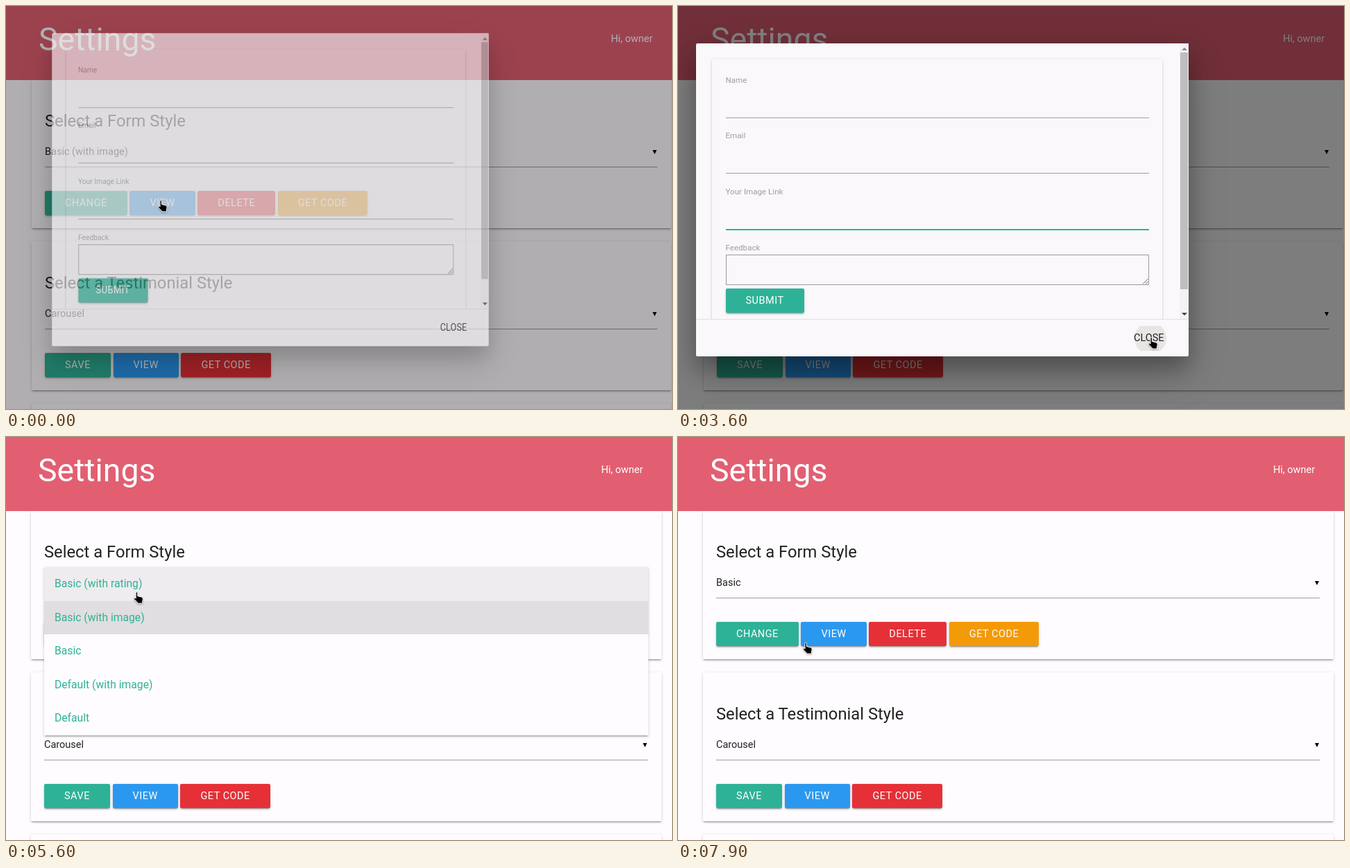
Write an HTML page that moves like this. It is 960 px wide and 582 px high and loops after 8 s.

```html
<!DOCTYPE html>
<html lang="en">
<head>
<meta charset="utf-8">
<title>Settings</title>
<style>
  html, body { margin: 0; width: 100%; height: 100%; overflow: hidden; background: #fefcfe; }
  body { font: 14.5px Roboto, sans-serif; color: rgba(0,0,0,.87); }
  #stage { position: relative; width: 960px; height: 582px; overflow: hidden; background: #fefcfe; }
  #stage div, #stage svg { position: absolute; box-sizing: border-box; }
  .text { line-height: 20px; white-space: pre; }
  .card { border-radius: 2px; background: #fefcfe; }
  .card, .btn, #menu { box-shadow: 0 2px 2px rgba(0,0,0,.14), 0 1px 5px rgba(0,0,0,.12), 0 3px 1px -2px rgba(0,0,0,.2); }
  #page { left: 0; top: 0; width: 945px; height: 582px; }
  #page.wide { left: 1px; width: 958px; }
  #page .card { left: 36px; right: 0; height: 215px; }
  #head { left: -1px; top: 0; width: 961px; height: 107px; background: #e25f72; color: #fff; }
  .rule { left: 19px; right: 20px; height: 1px; background: #9e9e9e; }
  .arrow { border: 3px solid transparent; border-top: 6px solid #000; border-bottom: 0; }
  .row { left: 19px; white-space: nowrap; }
  .btn { display: inline-block; height: 35px; line-height: 35px; padding: 0 29px; border-radius: 2px; color: #fff; letter-spacing: .5px; }
  #overlay { inset: 0; background: #000; }
  #modal { left: 26px; top: 54px; width: 710px; height: 452px; background: #faf8fb; border-radius: 2px; overflow: visible;
    box-shadow: 0 16px 28px rgba(0,0,0,.22), 0 25px 55px rgba(0,0,0,.21); }
  #content { left: 0; top: 0; width: 710px; height: 398px; overflow: hidden; }
  #content .card { left: 23px; top: 23px; width: 649px; height: 420px; background: #faf8fb; }
  .line { left: 43px; width: 610px; height: 1px; background: #9e9e9e; }
  .line.on { height: 2px; background: #2eb297; }
  .caret { left: 43px; width: 1px; height: 19px; background: #222; }
  #area { left: 43px; top: 305px; width: 610px; height: 44px; border: 1px solid #9b9a9c; }
  #bar { left: 697px; top: 0; width: 13px; height: 398px; background: #f4f2f5; }
  #foot { left: 0; top: 398px; width: 710px; height: 54px; border-top: 1px solid #e2e0e3; }
  #close { left: 602px; top: 408px; width: 102px; height: 36px; overflow: hidden; border-radius: 2px; }
  #ripple { border-radius: 50%; background: rgba(60,70,25,.1); }
  #menu { left: 55px; top: 188px; width: 871px; overflow: hidden; background: #fefcfe; color: #2eb297; }
  .item { left: 0; width: 100%; height: 48.6px; line-height: 48.6px; padding-left: 15px; font-size: 15.7px; }
  #cursor { left: 0; top: 0; filter: drop-shadow(0 1px 1px rgba(0,0,0,.35)); overflow: visible; }
</style>
</head>
<body>
<div id="stage"></div>
<script>
const LOOP = 8000, STEP = 100, ROW = 48.6;
const MODAL_OPEN = -97, MODAL_CLOSE = 3680, MENU_OPEN = 4504, MENU_CLOSE = 7420;

function box(parent, props = {}, css = '') {
  const node = document.createElement('div');
  Object.assign(node, props);
  node.style.cssText = css;
  parent.append(node);
  return node;
}
const text = (parent, x, middle, size, str, css = '') =>
  box(parent, { className: 'text', textContent: str },
    `left:${x}px;top:${middle - 10}px;font-size:${size}px;${css}`);

const stage = document.getElementById('stage');

// Page
const page = box(stage, { id: 'page' });
const TEAL = '#2eb297', BLUE = '#2b98f0', RED = '#e53037', ORANGE = '#f39a08';

function section(top, title, value, buttons) {
  const card = box(page, { className: 'card' }, `top:${top}px`);
  text(card, 19, 60, 23.78, title);
  const label = text(card, 19, 105, 14.5, value);
  box(card, { className: 'rule' }, 'top:126px');
  box(card, { className: 'arrow' }, 'right:21px;top:102px');
  const row = box(card, { className: 'row' }, 'top:161px');
  row.innerHTML = buttons.map(([name, color]) =>
    `<span class="btn" style="background:${color}">${name}</span>`).join(' ');
  return label;
}
const formValue = section(106, 'Select a Form Style', '',
  [['CHANGE', TEAL], ['VIEW', BLUE], ['DELETE', RED], ['GET CODE', ORANGE]]);
section(340, 'Select a Testimonial Style', 'Carousel',
  [['SAVE', TEAL], ['VIEW', BLUE], ['GET CODE', RED]]);
box(page, { className: 'card' }, 'top:574px');
const head = box(page, { id: 'head' });
text(head, 47, 48, 46.4, 'Settings');
const greeting = text(head, 859, 48, 14.5, 'Hi, owner');

// Dropdown
const menu = box(stage, { id: 'menu' });
const items = ['Basic (with rating)', 'Basic (with image)', 'Basic', 'Default (with image)', 'Default']
  .map((name, i) => box(menu, { className: 'item', textContent: name }, `top:${i * ROW}px`));

// Modal
const overlay = box(stage, { id: 'overlay' });
const modal = box(stage, { id: 'modal' });
const content = box(modal, { id: 'content' });
box(content, { className: 'card' });
const fields = ['Name', 'Email', 'Your Image Link'].map((name, i) => {
  const y = Math.floor(i * 80.5);
  text(content, 42.5, 53 + y, 11.6, name, 'color:#9e9e9e');
  return {
    line: box(content, { className: 'line' }, `top:${107 + y}px`),
    caret: box(content, { className: 'caret' }, `top:${76 + y}px`)
  };
});
text(content, 42.5, 295, 11.6, 'Feedback', 'color:#9e9e9e');
const area = box(content, { id: 'area' });
area.innerHTML = '<svg style="right:0;bottom:0" width="9" height="9"><path d="M1 8.5 8.5 1M5 8.5 8.5 5" stroke="#666"/></svg>';
box(content, { className: 'btn', textContent: 'SUBMIT' }, `left:42.5px;top:354px;background:${TEAL}`);
const bar = box(content, { id: 'bar' });
box(bar, {}, 'left:1px;top:13px;width:11px;height:342px;background:#bfbdc0');
box(bar, { className: 'arrow' }, 'left:3px;top:6px;border-width:4px 4px 0;transform:scaleY(-1);border-top-color:#888');
box(bar, { className: 'arrow' }, 'left:3px;top:389px;border-width:4px 4px 0;border-top-color:#444');
box(modal, { id: 'foot' });
const close = box(modal, { id: 'close' });
const ripple = box(close, { id: 'ripple' });
text(modal, 631, 426, 14.5, 'CLOSE');

// Cursor shapes are drawn around their middle
const SHAPES = {
  hand: '<path d="M-3 -7.2Q-3 -8.4 -1.8 -8.4T-.5 -7.2V-2.5L5 -1.2Q7.4 -.6 7.2 2L6.4 6V8H-.5L-1 6.5-5.4 2Q-6.4 .6-5.2 0T-3 1Z" fill="#000" stroke="#fff"/>',
  beam: '<path d="M-3.5 -8H-1L0 -7 1 -8H3.5M0 -7V7M-3.5 8H-1L0 7 1 8H3.5" fill="none" stroke="#fff" stroke-width="3"/>' +
        '<path d="M-3.5 -8H-1L0 -7 1 -8H3.5M0 -7V7M-3.5 8H-1L0 7 1 8H3.5" fill="none" stroke="#000" stroke-width="1.3"/>',
  arrow: '<path d="M-4 -8V6L-1 3.5 1 8 3.5 7 1.5 2.5H6Z" fill="#000" stroke="#fff"/>'
};
stage.insertAdjacentHTML('beforeend', '<svg id="cursor" width="1" height="1">' +
  Object.entries(SHAPES).map(([kind, path]) => `<g id="${kind}">${path}</g>`).join('') + '</svg>');
const cursor = document.getElementById('cursor');

const PATH = [
  [0, 225, 289], [100, 225, 289], [600, 214, 281], [1000, 214, 281], [1400, 140, 136],
  [1600, 140, 136], [1800, 133, 234], [2000, 132, 225], [2400, 132, 225], [2650, 140, 305],
  [2750, 140, 305], [3250, 690, 488], [3400, 684, 487], [3800, 684, 487], [4400, 205, 220],
  [5300, 205, 220], [6400, 124, 287], [6700, 124, 287], [6800, 124.5, 299],
  [7400, 124.5, 304], [7900, 186, 305]
];
const KINDS = [[0, 'hand'], [200, 'beam'], [2900, 'arrow'], [3200, 'hand'], [3900, 'arrow'], [4300, 'hand']];
const FOCUS = [[0, -1], [1600, 0], [2200, 1], [2700, 2]];

const clamp = v => Math.min(1, Math.max(0, v));
const span = (t, start, length) => clamp((t - start) / length);
const easeOut = (p, power) => 1 - (1 - p) ** power;
const latest = (table, t) => table.filter(row => row[0] <= t).pop();
const show = (node, on) => { node.style.display = on ? '' : 'none'; };

function cursorAt(t) {
  const i = PATH.findIndex(point => point[0] > t);
  if (i < 0) return PATH[PATH.length - 1].slice(1);
  const [t0, x0, y0] = PATH[i - 1], [t1, x1, y1] = PATH[i];
  const p = span(t, t0, t1 - t0), s = p * p * (3 - 2 * p);
  return [x0 + (x1 - x0) * s, y0 + (y1 - y0) * s];
}

function drawModal(t) {
  const shown = t < MODAL_CLOSE
    ? easeOut(span(t, MODAL_OPEN, 350), 3)
    : 1 - easeOut(span(t, MODAL_CLOSE, 250), 4);
  const open = shown > 0;
  page.className = open ? 'wide' : '';
  greeting.style.left = (open ? 872 : 859) + 'px';
  show(overlay, open);
  show(modal, open);
  overlay.style.opacity = shown / 2;
  modal.style.opacity = shown;
  modal.style.transform = shown < 1 ? `translateY(${(shown - 1) * 39}px) scaleX(${.7 + .3 * shown})` : '';

  const [since, focused] = latest(FOCUS, t);
  fields.forEach(({ line, caret }, i) => {
    line.classList.toggle('on', i === focused);
    show(caret, i === focused && (t - since) % 1000 < 500);
  });
  const r = t < 3600 ? 0 : 23 + (t - 3600) * .2;
  ripple.style.cssText = `left:${53 - r}px;top:${18 - r}px;width:${2 * r}px;height:${2 * r}px`;
}

function drawMenu(t, pointerY) {
  const p = span(t, MENU_OPEN, 300);
  const opacity = Math.sin(p * Math.PI / 2) * (1 - span(t, MENU_CLOSE, 250));
  show(menu, opacity > 0);
  menu.style.opacity = opacity;
  menu.style.height = easeOut(p, 3) * ROW * 5 + 'px';
  const hovered = Math.floor((pointerY - 8 - 188) / ROW);
  const selected = t < MENU_CLOSE ? 1 : 2;
  items.forEach((item, i) => {
    item.style.background = i === selected ? '#e0dee0' : i === hovered ? '#eeecee' : '';
  });
  formValue.textContent = t < MENU_CLOSE ? 'Basic (with image)' : 'Basic';
}

function draw(t) {
  const [x, y] = cursorAt(t);
  drawModal(t);
  drawMenu(t, y);
  cursor.style.transform = `translate(${x}px,${y}px)`;
  const kind = latest(KINDS, t)[1];
  for (const shape of cursor.children) show(shape, shape.id === kind);
}

const start = performance.now();
function tick() {
  const t = (performance.now() - start) % LOOP;
  draw(Math.floor(t / STEP) * STEP);
  requestAnimationFrame(tick);
}
tick();
</script>
</body>
</html>
```
